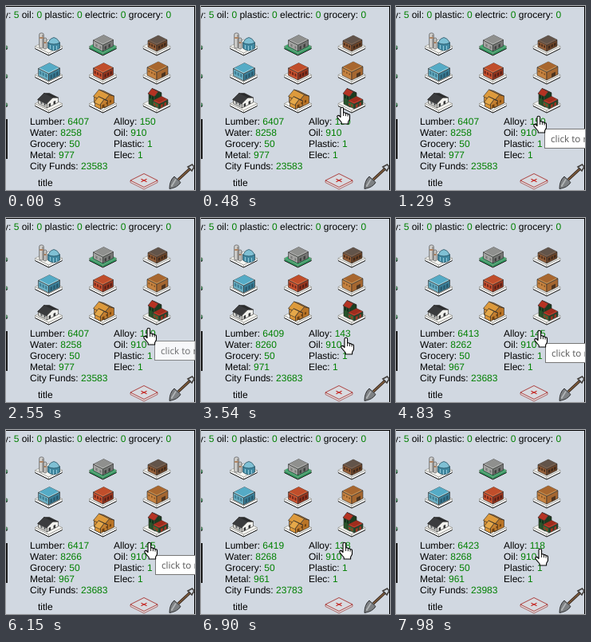
Animation of 237x231 px, one loop 8 s. Source, as an HTML page:

```html
<!DOCTYPE html>
<html lang="en">
<head>
<meta charset="utf-8">
<title>City panel</title>
<style>
  html, body { margin: 0; width: 100%; height: 100%; overflow: hidden; background: #d1d8e1; }
  svg { display: block; width: 237px; height: 231px; }
  text { font: 12px "Liberation Sans", Arial, sans-serif; text-rendering: geometricPrecision; }
  tspan { fill: #008000; }
  #tip text { font: 11.7px "Open Sans", "Noto Sans", sans-serif; fill: #575757; }
</style>
</head>
<body>
<svg id="stage" viewBox="0 0 237 231"></svg>
<script>
const LOOP = 8000, TICK = 30;
const stage = document.getElementById('stage');

const poly = (pts, fill, extra = '') => `<polygon points="${pts.join(' ')}" fill="${fill}" ${extra}/>`;
const rect = (x, y, w, h, fill, extra = '') =>
  `<rect x="${x}" y="${y}" width="${w}" height="${h}" fill="${fill}" ${extra}/>`;
const path = (d, extra) => `<path d="${d}" ${extra}/>`;
const label = (x, y, name, id, value = '') =>
  `<text x="${x}" y="${y}">${name} <tspan id="${id}">${value}</tspan></text>`;

// Flat diamond with its front corner at (x, y), a and b the left and right depths.
const diamond = (x, y, a, b, fill, extra) =>
  poly([x, y, x - a, y - a / 2, x + b - a, y - (a + b) / 2, x + b, y - b / 2], fill, extra);

// Isometric block standing on such a diamond.
function block(x, y, a, b, h, top, left, right, edge = '#2b2b2b') {
  const t = y - h, line = `stroke="${edge}" stroke-width=".6" stroke-linejoin="round"`;
  return poly([x, y, x - a, y - a / 2, x - a, t - a / 2, x, t], left, line) +
    poly([x, y, x + b, y - b / 2, x + b, t - b / 2, x, t], right, line) +
    diamond(x, t, a, b, top, line);
}

// Block whose flat roof is sunk behind a rim.
const flat = (x, y, a, b, h, rim, roof, left, right) =>
  block(x, y, a, b, h, rim, left, right) + diamond(x, y - h - 1.6, a - 1.6, b - 1.6, roof);

// Panels on the left (side -1) or right (side 1) wall of a block.
function windows(x, y, side, count, gap, w, h, fill) {
  let s = '';
  for (let i = 0; i < count; i++) {
    const u = 2 + i * gap, x1 = x + side * u, x2 = x + side * (u + w);
    s += poly([x1, y - u / 2, x2, y - (u + w) / 2, x2, y - (u + w) / 2 - h, x1, y - u / 2 - h], fill);
  }
  return s;
}

// House with a ridge roof over its left wall.
function house(x, y, a, b, h, rise, roof, shade, left, right) {
  const t = y - h, line = 'stroke="#2b2b2b" stroke-width=".6"';
  const rx = x + b / 2, ry = t - b / 4 - rise;
  return poly([x, y, x - a, y - a / 2, x - a, t - a / 2, x, t], left, line) +
    poly([x, y, x + b, y - b / 2, x + b, t - b / 2, rx, ry, x, t], right, line) +
    poly([rx, ry, x + b, t - b / 2, x + b - a, t - (a + b) / 2, rx - a, ry - a / 2], shade, line) +
    poly([x - 1, t + 1, x - a - 1, t - a / 2 + 1, rx - a, ry - a / 2, rx, ry], roof, line);
}

const plot = (x, y, top = '#f4f4f0', side = '#fff') =>
  block(x, y, 17, 17, 3, top, side, side, '#8a8a84') +
  path(`M${x - 17} ${y - 8.5}L${x} ${y}l17 -8.5`, 'fill="none" stroke="#1c1c1c"');

function silos(x, y) {
  const tube = (cx, top, bottom, w) =>
    rect(cx - w / 2, top, w, bottom - top, '#d3d2cf', 'rx="2" stroke="#4c4c4c" stroke-width=".7"') +
    rect(cx + .6, top + 2, w / 2 - 1, bottom - top - 3, '#93928f') +
    rect(cx - w / 2 + .4, top + 5, w - .8, 2, '#b08462');
  return tube(x - 4.5, y - 22, y - 8, 4) + tube(x - 9, y - 28, y - 9, 5.5) +
    path(`M${x - 1} ${y - 16}v7q7.5 6 15 0v-7z`, 'fill="#3f87a0" stroke="#1f4757" stroke-width=".7"') +
    path(`M${x - 1} ${y - 16}q7.5 -13 15 0q-7.5 4 -15 0z`, 'fill="#7fc0d4" stroke="#1f4757" stroke-width=".7"') +
    path(`M${x + 2} ${y - 13}v5M${x + 6} ${y - 12}v6M${x + 10} ${y - 12}v5`, 'stroke="#94cadb"');
}

const buildings = [
  silos,
  (x, y) => flat(x, y - 5, 12, 13, 8, '#b9b9b7', '#8f908e', '#a3a3a1', '#747573') +
    windows(x, y - 7, -1, 2, 5, 2, 3, '#777876') + windows(x, y - 6, 1, 2, 5, 2.4, 4, '#3e3f3e'),
  (x, y) => flat(x, y - 5, 11, 13, 8, '#8a6b55', '#62544a', '#96603a', '#6d4529') +
    windows(x, y - 8, -1, 3, 3, 1.8, 3, '#4a2d1a') + windows(x, y - 7, 1, 3, 3.6, 2.2, 3.4, '#39261a'),
  (x, y) => flat(x, y - 4, 13, 14, 9, '#a5d8e4', '#55abc6', '#6cb0c4', '#3b7f98') +
    windows(x, y - 7, -1, 3, 3.6, 2.4, 4, '#3f7f95') + windows(x, y - 5, 1, 3, 3.8, 2.4, 5, '#28586c'),
  (x, y) => flat(x, y - 5, 12, 13, 9, '#dc7248', '#c04e2b', '#c95230', '#94351e') +
    windows(x, y - 8, -1, 3, 3.4, 2, 3.6, '#70281a') + windows(x, y - 7, 1, 3, 3.6, 2, 4, '#4f1d15'),
  (x, y) => flat(x, y - 5, 12, 14, 10, '#d49a58', '#a8672f', '#c58240', '#a56730') +
    windows(x, y - 10, -1, 3, 3.4, 1.6, 2, '#80501f') + windows(x + 4, y - 7, 1, 1, 4, 5, 5, '#4d3520'),
  (x, y) => house(x - 2, y - 6, 11, 14, 6, 3.5, '#3b3c3e', '#2a2b2c', '#d5d5d0', '#f2f2ee') +
    windows(x - 2, y - 7.5, -1, 2, 4, 2, 3, '#55585c') + windows(x - 2, y - 6, 1, 2, 6, 2.6, 4, '#38393a'),
  (x, y) => house(x + 2, y - 6, 13, 12, 9, 4.5, '#dd9a3c', '#b06f24', '#d28a32', '#b97426') +
    house(x - 3, y - 4.5, 7, 9, 6, 4, '#e5a849', '#b9752a', '#db9639', '#c58030') +
    windows(x + 2, y - 9, 1, 2, 4.4, 2, 3, '#6e400f') + windows(x - 3, y - 4.5, 1, 1, 4, 3, 4, '#6e400f'),
  (x, y) => house(x - 2, y - 7, 8, 8, 14, 3.5, '#b53323', '#7c2116', '#28552a', '#1c3d1f') +
    flat(x + 3, y - 5, 8, 11, 6, '#cc4630', '#9e2d1d', '#3a6e35', '#25482a') +
    windows(x - 2, y - 15, -1, 2, 3.2, 1.8, 4, '#12281a') +
    windows(x + 3, y - 6, -1, 2, 3, 1.8, 3, '#a03322') + windows(x + 3, y - 5, 1, 2, 4.4, 2.6, 4, '#a03322')
];

function grid() {
  let s = '';
  for (let row = 0; row < 3; row++) {
    const y = 62 + row * 36;
    s += plot(-15, y, '#2f8a58', '#2f8a58');
    [53.5, 121.5, 189].forEach((x, col) => {
      const n = row * 3 + col;
      s += (n === 1 ? plot(x, y, '#35b36e', '#2c9d5e') : plot(x, y)) + buildings[n](x, y);
    });
  }
  return s;
}

const emptyPlot =
  path('M156 219v2.5l17 8.5l17 -8.5v-2.5z', 'fill="#e4e2e4" stroke="#a04a48" stroke-width=".8"') +
  diamond(173, 227.5, 17, 17, '#d9dbe0', 'stroke="#a82f2d" stroke-width=".9"') +
  path('M169.5 217.3l7 3.4m0 -3.4l-7 3.4', 'stroke="#c4201c" stroke-width="1.1" fill="none"');

const shovel =
  path('M231 204L216 218', 'stroke="#33251d" stroke-width="3.4"') +
  path('M231 204L216 218', 'stroke="#84603f" stroke-width="1.7"') +
  path('M228 202l5.5 -3l2.5 3l-3 5z', 'fill="none" stroke="#44403e" stroke-width="1.6"') +
  path('M211 214l8 7.5q-4 6.5 -14 8q0 -10.5 6 -15.5z', 'fill="#7d8083" stroke="#2e3032" stroke-width="1"') +
  path('M213 217.5l-5.5 9', 'stroke="#b4b7b9" stroke-width="1.6"');

const header = ['y: |5', ' oil: |0', ' plastic: |0', ' electric: |0', ' grocery: |0']
  .map(s => s.replace(/\|(\d)/, '<tspan>$1</tspan>')).join('');

const hand =
  path('M5 12V3Q5 1.2 6.8 1.2Q8.6 1.2 8.6 3V8Q10.8 7.2 11.4 8.8Q13.5 8.2 14.1 9.8Q16.5 9.4 16.5 11.6V16L14.6 19.6V22H6.2V20L1 13.9Q.2 11.8 2.2 11.4Q3.6 11.4 5 13.6Z',
    'fill="#fff" stroke="#000" stroke-width="1.1" stroke-linejoin="round"') +
  path('M8.6 8v4M11.4 8.8v3.4M14.1 9.8v2.8', 'stroke="#000" stroke-width=".9"');

stage.innerHTML =
  rect(0, 0, 237, 231, '#d1d8e1') + rect(0, 142, 2, 50, '#1c1c1c') +
  rect(0, 0, 237, 1, '#000') + rect(236, 0, 1, 231, '#000') +
  `<text x="-3" y="15">${header}</text>` + grid() +
  label(30, 149, 'Lumber:', 'lumber') + label(30, 163, 'Water:', 'water') +
  label(30, 177, 'Grocery:', 'grocery', 50) + label(30, 191, 'Metal:', 'metal') +
  label(30, 205, 'City Funds:', 'funds') +
  label(135, 149, 'Alloy:', 'alloy') + label(135, 163, 'Oil:', 'oil', 910) +
  label(135, 177, 'Plastic:', 'plastic', 1) + label(135, 191, 'Elec:', 'elec', 1) +
  '<text x="40" y="226">title</text>' + emptyPlot + shovel +
  `<g id="tip">${rect(.5, .5, 80, 24, '#fff', 'stroke="#767676"')}<text x="8" y="16.5">click to r</text></g>` +
  `<g id="hand">${hand}</g>`;

const el = id => document.getElementById(id);
const tip = el('tip'), pointer = el('hand');

// Times at which each resource ticks; smelting turns 2 metal into 1 alloy, a sale 10 alloy into 100 funds.
const ticks = {
  lumber: [2700, 3810, 4470, 5040, 5640, 6810, 7110, 7890],
  water: [3180, 4260, 5100, 6150, 6900],
  smelt: [2850, 3120, 3180, 4470, 4830, 6570, 6810, 6900],
  sale: [2580, 6450, 7050, 7590]
};
const moves = [
  [150, 194, 83], [300, 182, 105], [480, 170, 126], [600, 168, 138], [690, 170, 141], [780, 172, 137],
  [3510, 172, 137], [3540, 175, 149], [3720, 175, 167], [3840, 174, 165], [4140, 173, 141],
  [4230, 173, 141], [4260, 173, 139], [4290, 173, 140],
  [7860, 173, 140], [7890, 174, 146], [7950, 174, 146], [7980, 174, 148]
];
const tips = [
  { from: 1290, fade: 2550, x: 186, y: 154 },
  { from: 4680, fade: 6420, x: 187, y: 157 }
];
const FADE = 150;

function place(t) {
  const i = moves.findIndex(m => m[0] > t);
  if (i < 0) return moves[moves.length - 1].slice(1);
  const [t0, x0, y0] = moves[i - 1], [t1, x1, y1] = moves[i], k = (t - t0) / (t1 - t0);
  return [Math.round(x0 + (x1 - x0) * k), Math.round(y0 + (y1 - y0) * k)];
}

function draw(now) {
  const t = Math.floor((now % LOOP) / TICK) * TICK;
  const count = key => ticks[key].filter(at => at <= t).length;
  const smelted = count('smelt'), sold = count('sale');
  const values = {
    lumber: 6407 + 2 * count('lumber'),
    water: 8258 + 2 * count('water'),
    metal: 977 - 2 * smelted,
    alloy: 150 + smelted - 10 * sold,
    funds: 23583 + 100 * sold
  };
  for (const id in values) el(id).textContent = values[id];

  const shown = tips.find(p => t >= p.from && t < p.fade + FADE);
  tip.style.display = shown ? '' : 'none';
  if (shown) {
    tip.setAttribute('transform', `translate(${shown.x} ${shown.y})`);
    tip.setAttribute('opacity', t < shown.fade ? 1 : 1 - (t - shown.fade + TICK) / (FADE + TICK));
  }

  const visible = t >= moves[0][0];
  pointer.style.display = visible ? '' : 'none';
  if (visible) pointer.setAttribute('transform', `translate(${place(t)})`);
}

const start = performance.now();
function loop() {
  draw(performance.now() - start);
  requestAnimationFrame(loop);
}
loop();
</script>
</body>
</html>
```
